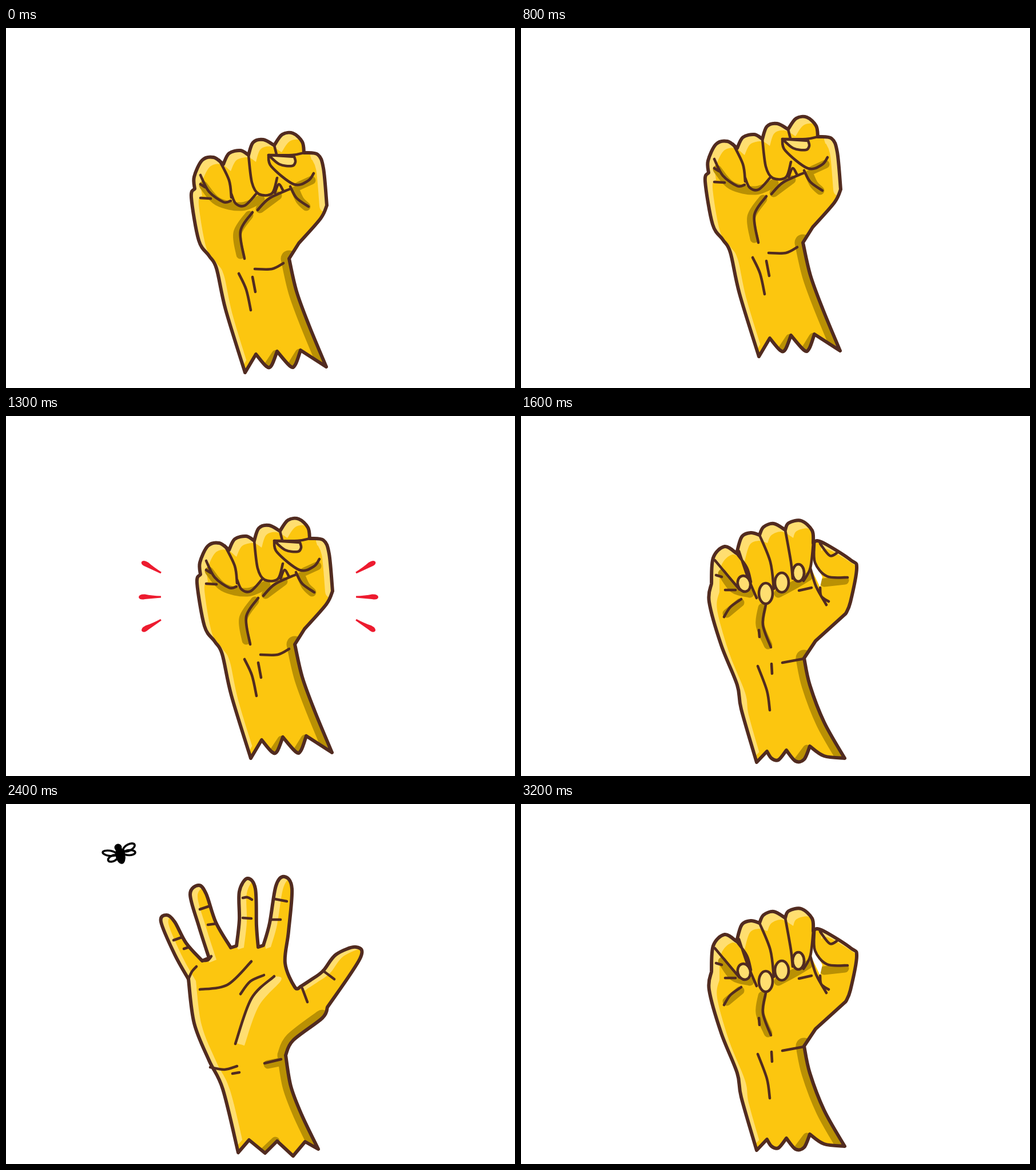
Animation of 890 by 629 pixels, one loop 3.3 s. Source, as an HTML page:

```html
<!DOCTYPE html>
<html lang="en">
<head>
<meta charset="utf-8">
<title>Raised hand</title>
<style>
html, body { margin: 0; width: 100%; height: 100%; overflow: hidden; background: #fff; }
svg { display: block; width: 890px; height: 629px; }
path { fill: none; stroke-linecap: round; stroke-linejoin: round; }
.skin { fill: #fcc60f; }
.light, .gleam { fill: #ffde70; }
.lit { stroke: #ffde70; stroke-width: 26px; }
.torn { stroke: #fcc60f; stroke-width: 18px; }
.dark, .right, .inner { stroke: #b99004; stroke-width: 15px; }
.right { stroke-width: 29px; }
.inner { stroke-width: 22px; }
.hole { fill: #fff; }
.edge, .line, .nail { stroke: #512b20; stroke-width: 4.6px; }
.edge { stroke-width: 6px; }
.nail { fill: #ffde70; }
.wing { fill: none; stroke: #000; stroke-width: 3.6px; }
#ray { fill: #ed1b2f; }

.pose, #rays, #bee { opacity: 0; animation: 3300ms step-end infinite; }
#fist { animation-name: showFist, pump; }
#loose { animation-name: showLoose; }
#half { animation-name: showHalf; }
#open { animation-name: showOpen, sway; }
#rays { animation-name: showRays; }
#bee { animation-name: showBee, fly; }

@keyframes showFist { 0% { opacity: 1 } 48.48%, 100% { opacity: 0 } }
@keyframes showLoose { 0% { opacity: 0 } 48.48% { opacity: 1 } 57.57% { opacity: 0 } 93.93%, 100% { opacity: 1 } }
@keyframes showHalf { 0% { opacity: 0 } 57.57% { opacity: 1 } 63.63% { opacity: 0 } 90.9% { opacity: 1 } 93.93%, 100% { opacity: 0 } }
@keyframes showOpen { 0% { opacity: 0 } 63.63% { opacity: 1 } 90.9%, 100% { opacity: 0 } }
@keyframes showRays { 0% { opacity: 0 } 15.15% { opacity: 1 } 24.24% { opacity: 0 } 36.36% { opacity: 1 } 45.45%, 100% { opacity: 0 } }
@keyframes showBee { 0% { opacity: 0 } 57.57% { opacity: 1 } 90.9%, 100% { opacity: 0 } }

@keyframes pump {
  0% { transform: none; animation-timing-function: steps(4) }
  12.12% { transform: translate(-5px, -25px); animation-timing-function: steps(2) }
  18.18% { transform: translate(6px, 2px); animation-timing-function: steps(2) }
  24.24% { transform: translate(-2px, -28px) }
  27.27% { transform: translate(-4px, -33px); animation-timing-function: steps(3) }
  36.36% { transform: translate(8px, 4px) }
  39.39% { transform: translate(10px, -4px); animation-timing-function: steps(2) }
  45.45%, 100% { transform: translate(4px, -16px) }
}
@keyframes sway {
  0%, 63.63% { transform: translate(3px, 5px); animation-timing-function: steps(3) }
  72.72% { transform: translate(-3px, 3px); animation-timing-function: steps(4) }
  84.84%, 100% { transform: none }
}
@keyframes fly {
  0% { transform: translate(405px, 325px) }
  63.63% { transform: translate(345px, 306px) }
  66.66% { transform: translate(270px, 262px) }
  69.69% { transform: translate(216px, 182px) }
  72.72% { transform: translate(198px, 87px) }
  75.75% { transform: translate(275px, 46px) }
  78.78% { transform: translate(400px, 36px) }
  81.81% { transform: translate(530px, 85px) }
  84.84% { transform: translate(620px, 187px) }
  87.87%, 100% { transform: translate(635px, 285px) }
}
</style>
</head>
<body>
<svg viewBox="0 0 890 629">
  <defs>
    <path id="ray" d="M0-1.5Q-16-2-28-4.5Q-39-5-39 1Q-37 6-28 4L0 1.5Z"/>
    <g id="trio">
      <use href="#ray" transform="translate(271 274) rotate(30)"/>
      <use href="#ray" transform="translate(271 316)"/>
      <use href="#ray" transform="translate(271 356) rotate(-30)"/>
    </g>
  </defs>
  <g id="rays">
    <use href="#trio"/>
    <use href="#trio" transform="translate(883 0) scale(-1 1)"/>
  </g>

  <g class="pose" id="fist" data-shift="13 12">
    <g class="shade">
      <path class="rim" data-p="418 602 384 492 368 420 355 398 337 371 324 296 330 281"/>
      <path class="rim" data-p="329 260 343 231 363 226 380 238 | 390 219 410 214 424 222"/>
      <path class="rim" data-p="432 200 450 195 469 205 | 483 186 502 184 518 199 521 218"/>
      <path class="rim lit" data-p="545 221 555 245 561 310"/>
      <path class="rim" data-p="550 333 512 376"/>
      <path class="rim torn" data-p="515 563 | 506 588 497 591 474 565 | 464 590 455 591 437 570 | 418 602"/>
      <path class="rim right" data-p="495 403 | 508 460 530 520 560 592"/>
      <path class="dark" data-p="425 327 405 358 410 396; 345 275 370 303 412 312 445 299"/>
      <path class="dark" data-p="444 316 475 293; 506 284 514 301 525 312; 512 276 534 266"/>
      <path class="dark" data-p="458 591 472 570; 500 589 513 568"/>
    </g>
    <path class="nail" data-p="459 222 478 238 500 241 506 234 504 225"/>
    <path class="line" data-p="373 231 390 266 394 296; 340 257 355 286 380 304 393 302; 394 290 402 307 418 310 438 289"/>
    <path class="line" data-p="424 222 430 270 442 290 465 289 474 262; 469 205 473 221"/>
    <path class="line" data-p="521 218 500 222 459 222 | 464 242 503 273 528 267 538 254"/>
    <path class="line" data-p="440 318 460 298 497 281; 497 277 508 297 529 312; 470 288 477 273 485 285; 431 322 410 355 417 403"/>
    <path class="line" data-p="435 421 465 421 485 411; 407 429 420 457 428 493; 431 435 436 461; 340 273 348 278; 340 297 358 298"/>
  </g>

  <g class="pose" id="loose" data-shift="14 14">
    <g class="shade">
      <path class="rim" data-p="412 605 385 512 378 470 350 400 329 325 333 293"/>
      <path class="rim" data-p="336 248 356 228 377 240 | 386 211 402 204 417 208"/>
      <path class="rim" data-p="424 194 442 188 462 199 | 468 187 490 183 509 200 511 222"/>
      <path class="rim" data-p="518 218 535 225 577 252 587 266 576 325 568 345 | 515 393"/>
      <path class="rim torn" data-p="530 594 505 577 | 495 600 480 603 464 584 | 450 601 438 598 430 586 | 412 605"/>
      <path class="rim right" data-p="495 423 | 505 470 530 535 566 598"/>
      <path class="dark" data-p="422 335 418 365 432 400; 352 275 372 302 400 310; 360 345 383 326"/>
      <path class="dark" data-p="450 310 480 294 503 280; 530 291 566 287; 485 602 500 582"/>
    </g>
    <path class="hole" data-p="510 249 527 281 | 523 299 | 508 268"/>
    <path class="line" data-p="339 252 360 277 382 303; 377 240 395 265 402 290; 381 236 396 280 412 318"/>
    <path class="line" data-p="417 208 436 255 442 302; 462 199 472 255 475 284; 511 222 506 265 494 288"/>
    <path class="line" data-p="513 222 514 256 535 280 571 282; 523 223 540 244 554 238; 506 266 516 298 534 330; 523 300 525 315 538 324"/>
    <path class="line" data-p="428 330 423 365 437 404; 416 374 417 386; 438 433 439 450; 457 431 495 424; 414 437 430 480 435 514"/>
    <path class="line" data-p="355 351 366 334 385 320; 486 305 508 300; 341 278 351 281; 357 304 375 304"/>
    <ellipse class="nail" cx="390" cy="293" rx="11" ry="14" transform="rotate(-15 390 293)"/>
    <ellipse class="nail" cx="428" cy="310" rx="12" ry="18"/>
    <ellipse class="nail" cx="456" cy="291" rx="12" ry="17"/>
    <ellipse class="nail" cx="485" cy="274" rx="10" ry="15"/>
  </g>

  <g class="pose" id="half" data-shift="13 5">
    <g class="shade">
      <path class="rim" data-p="419 607 380 480 350 415 335 350 339 300 330 217"/>
      <path class="rim" data-p="337 206 354 193 367 202 367 232 375 264"/>
      <path class="rim" data-p="379 205 390 140 406 125 425 141 | 441 136 459 151 | 480 144 494 163 490 178"/>
      <path class="rim inner" data-p="497 225 503 290 519 317"/>
      <path class="rim" data-p="534 294 542 285 | 533 258 552 221 580 245 592 276 566 355"/>
      <path class="rim torn" data-p="545 595 520 578 | 498 604 473 586 | 455 602 441 584 | 419 607"/>
      <path class="rim right" data-p="560 362 515 403 497 432 | 507 475 535 540 568 597"/>
      <path class="dark" data-p="460 600 470 590; 504 602 517 584"/>
      <path class="gleam" data-p="474 298 482 320 445 380 425 420 | 416 416 | 425 350 474 298"/>
    </g>
    <path class="line" data-p="393 184 404 188 415 186; 393 220 404 221 413 215; 398 261 413 247"/>
    <path class="line" data-p="345 231 366 229; 352 249 368 249; 350 279 362 275 375 264"/>
    <path class="line" data-p="425 141 418 185 414 247; 421 174 446 178 459 151; 425 207 439 210 453 206; 414 247 435 250 453 244"/>
    <path class="line" data-p="453 176 453 244; 458 179 478 185 491 176; 469 209 493 205; 455 243 482 246; 428 141 437 146 448 141; 463 151 475 152 486 148"/>
    <path class="line" data-p="355 310 400 307 451 279; 474 298 425 350 414 416; 439 436 476 437 482 431; 419 447 435 503 439 529; 413 460 418 478"/>
    <path class="line" data-p="542 285 555 293 572 295; 511 307 525 322; 521 316 540 318; 556 224 560 242 574 253"/>
  </g>

  <g class="pose" id="open" data-shift="13 3">
    <g class="shade">
      <path class="rim" data-p="409 606 382 495 358 445 332 380 322 303"/>
      <path class="rim" data-p="298 260 274 203 284 191 298 203 318 240 346 271 | 358 266"/>
      <path class="rim" data-p="340 210 325 155 340 139 353 154 370 204 396 248 | 406 245"/>
      <path class="rim" data-p="411 200 411 150 425 127 439 145 441 210 444 247 | 453 244"/>
      <path class="rim" data-p="464 205 475 140 490 124 503 145 497 220 491 275 508 317 518 316"/>
      <path class="rim" data-p="535 305 557 289 580 260 615 247 622 267 565 352"/>
      <path class="rim torn" data-p="526 587 | 505 612 | 477 586 | 456 607 | 428 584 | 409 606"/>
      <path class="rim right" data-p="556 371 505 410 492 436 | 501 490 520 540 549 600"/>
      <path class="dark" data-p="461 452 486 447; 455 604 474 586"/>
      <path class="gleam" data-p="472 298 484 305 445 350 420 419 | 406 415 | 432 340 472 298"/>
    </g>
    <path class="line" data-p="296 235 310 230; 314 250 323 247; 322 303 328 290 336 281; 346 271 356 270 362 263"/>
    <path class="line" data-p="342 181 357 176; 356 208 371 206; 417 161 425 160 433 164; 417 196 432 197; 473 163 494 167; 466 199 483 199"/>
    <path class="line" data-p="342 321 390 313 432 272; 413 329 430 307 454 296; 472 298 432 337 404 416"/>
    <path class="line" data-p="360 457 385 461 407 455; 399 468 411 466; 455 450 484 443; 521 319 530 343; 557 288 577 303"/>
  </g>

  <g id="bee">
    <g class="wing">
      <ellipse cx="-17" cy="-1" rx="12" ry="4.5" transform="rotate(8 -17 -1)"/>
      <ellipse cx="-11" cy="8" rx="9" ry="5" transform="rotate(-24 -11 8)"/>
      <ellipse cx="17" cy="-11" rx="11" ry="5.5" transform="rotate(-28 17 -11)"/>
      <ellipse cx="18" cy="-2" rx="10" ry="4.5" transform="rotate(-3 18 -2)"/>
    </g>
    <circle cx="-2" cy="-11" r="6.5"/>
    <ellipse cx="2" cy="3" rx="8.5" ry="15" transform="rotate(-12 2 3)"/>
  </g>
</svg>
<script>
function make(tag, attrs) {
  const el = document.createElementNS("http://www.w3.org/2000/svg", tag);
  for (const key in attrs) el.setAttribute(key, attrs[key]);
  return el;
}

// Catmull-Rom spline through x y points; "|" keeps a sharp corner.
function smooth(text) {
  let d = "", corner = null;
  for (const run of text.split("|")) {
    const n = run.trim().split(/\s+/).map(Number);
    const pts = corner ? [corner] : [];
    for (let i = 0; i < n.length; i += 2) pts.push([n[i], n[i + 1]]);
    if (!corner) d = "M" + pts[0];
    for (let i = 0; i < pts.length - 1; i++) {
      const b = pts[i], c = pts[i + 1];
      const a = pts[i - 1] || b, e = pts[i + 2] || c;
      const c1 = b.map((v, k) => v + (c[k] - a[k]) / 6);
      const c2 = c.map((v, k) => v - (e[k] - b[k]) / 6);
      d += `C${c1} ${c2} ${c}`;
    }
    corner = pts[pts.length - 1];
  }
  return d;
}

const closed = ["nail", "hole", "gleam"];
for (const path of document.querySelectorAll("[data-p]")) {
  const end = closed.includes(path.className.baseVal) ? "Z" : "";
  path.setAttribute("d", path.dataset.p.split(";").map(smooth).join("") + end);
}

// The rims join into one outline; its shifted copy leaves a light band on the left and top.
for (const pose of document.querySelectorAll(".pose")) {
  const shade = pose.querySelector(".shade");
  const rims = [...shade.querySelectorAll(".rim")];
  const last = rims.findIndex(r => r.classList.contains("torn"));
  rims.push(rims.splice(last, 1)[0]);
  const d = smooth(rims.map(r => r.dataset.p).join("|")) + "Z";
  const clip = make("clipPath", { id: pose.id + "Clip" });
  clip.append(make("path", { d }));
  pose.prepend(clip);
  shade.setAttribute("clip-path", `url(#${clip.id})`);
  shade.prepend(
    make("path", { class: "light", d }),
    make("path", { class: "skin", d, transform: `translate(${pose.dataset.shift})` })
  );
  shade.after(make("path", { class: "edge", d }));
}
</script>
</body>
</html>
```
